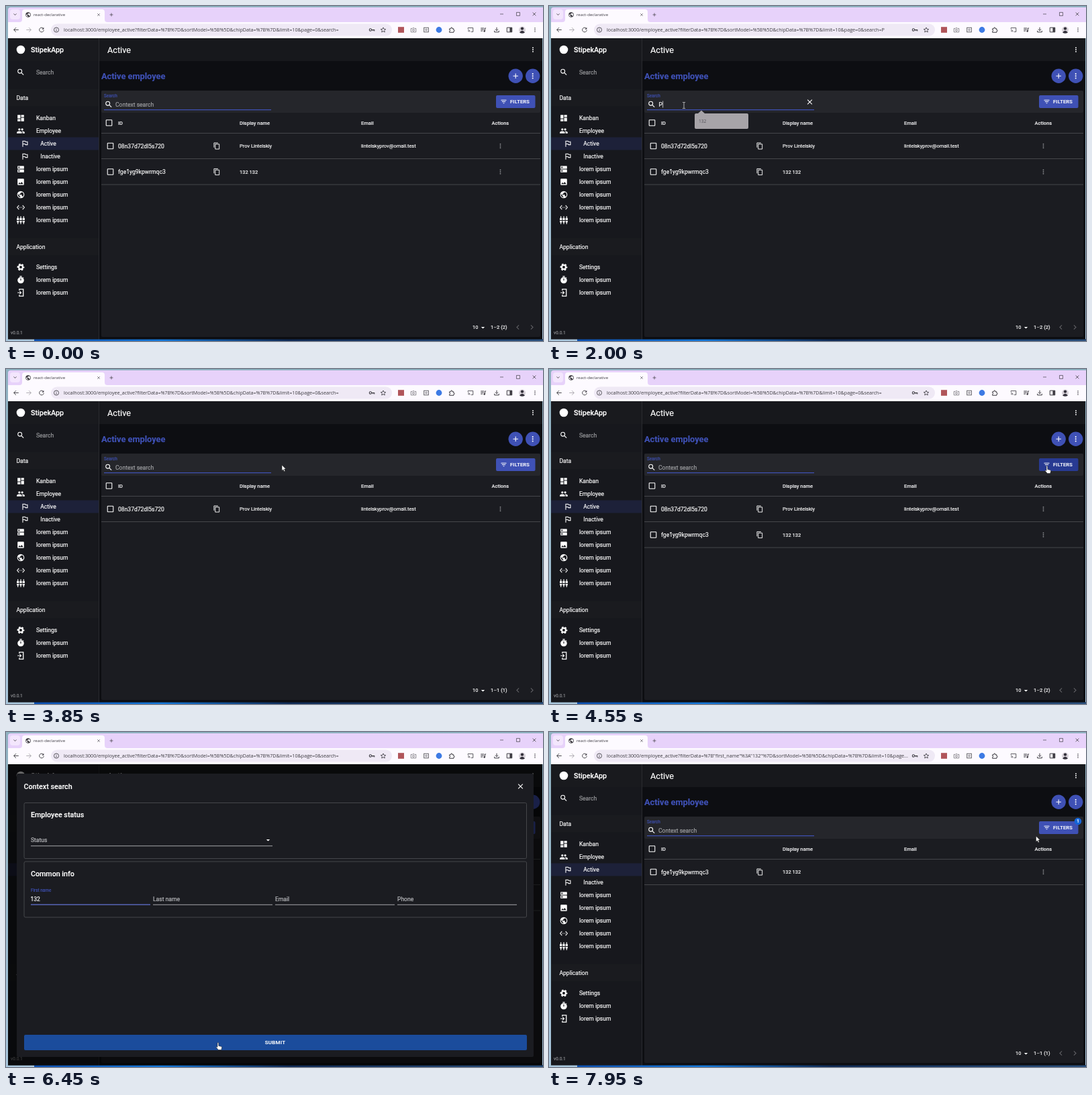
Recreate the animation shown at these times as an HTML page. Size 800 by 499 pixels, loop 8 s.

```html
<!DOCTYPE html>
<html lang="en">
<head>
<meta charset="utf-8">
<title>react-declarative</title>
<style>
html, body { margin: 0; width: 100%; height: 100%; overflow: hidden; background: #0e0f13; }
svg { display: block; width: 100vw; height: 100vh; }
text { font-family: Roboto, sans-serif; white-space: pre; stroke: currentColor; stroke-width: .18; }
.ui { font-family: "Open Sans", sans-serif; stroke: none; }
</style>
</head>
<body>
<svg id="stage" viewBox="0 0 800 499" xmlns="http://www.w3.org/2000/svg"></svg>
<script>
const LOOP = 8000;
const INDIGO = '#3f51b5', WHITE = '#fff', INK = '#3c3a40';
const BODY = 8.56, SMALL = 7.49, TITLE = 10.7, LABEL = 6.42;

// Icons on a 24 unit grid
const stroke = (d, w = 2) => `<path d="${d}" fill="none" stroke="currentColor" stroke-width="${w}"/>`;
const fill = d => `<path d="${d}" fill="currentColor" fill-rule="evenodd"/>`;
const dot = (x, y, r) => `<circle cx="${x}" cy="${y}" r="${r}" fill="currentColor"/>`;
const ring = (x, y, r, w = 2, extra = '') =>
  `<circle cx="${x}" cy="${y}" r="${r}" fill="none" stroke="currentColor" stroke-width="${w}" ${extra}/>`;
const plug = x => stroke(`M${x} 1v6M${x} 17v6`) + fill(`M${x - 3} 6h6v6h-6zM${x - 3} 14h6v2a3 3 0 0 1-6 0z`);
const server = y => fill(`M4 ${y}h16a1 1 0 0 1 1 1v6a1 1 0 0 1-1 1h-16a1 1 0 0 1-1-1v-6a1 1 0 0 1 1-1zM5 ${y + 4}a2 2 0 0 0 4 0a2 2 0 0 0-4 0z`);
const person = x => dot(x, 8, 3) + fill(`M${x - 7} 19v-2.5c0-4.7 14-4.7 14 0V19z`);
const icons = {
  search: ring(9.5, 9.5, 5.5) + stroke('M14 14l5.8 5.8', 2.2),
  dashboard: fill('M3 3h8v10H3zM3 15h8v6H3zM13 11h8v10h-8zM13 3h8v6h-8z'),
  people: person(8) + dot(16, 8, 3) + fill('M16 13c3 0 7 1.2 7 3.5V19h-6v-2.5c0-1.5-.8-2.6-2-3.45z'),
  flag: stroke('M6 21V5h6.4l1 2H19v8h-5.4l-1-2H6'),
  dns: server(3) + server(13),
  image: fill('M5 3h14a2 2 0 0 1 2 2v14a2 2 0 0 1-2 2H5a2 2 0 0 1-2-2V5a2 2 0 0 1 2-2zM8.5 13.5L5 18h14l-4.5-6-3.5 4.5z'),
  globe: fill('M12 2a10 10 0 0 0 0 20a10 10 0 0 0 0-20zM11 19.93A8 8 0 0 1 4.21 10.21L9 15v1a2 2 0 0 0 2 2zM17.9 17.39A2 2 0 0 0 16 16h-1v-3a1 1 0 0 0-1-1H8v-2h2a1 1 0 0 0 1-1V7h2a2 2 0 0 0 2-2v-.41A8 8 0 0 1 17.9 17.39z'),
  code: stroke('M7 6l-5 6 5 6M17 6l5 6-5 6') + fill('M7 11h2v2H7zM11 11h2v2h-2zM15 11h2v2h-2z'),
  plugs: plug(4) + plug(12) + plug(20),
  gear: ring(12, 12, 5.6, 4) + ring(12, 12, 8.4, 3.4, 'stroke-dasharray="5 3.796" stroke-dashoffset="2.5"'),
  timer: fill('M9 1h6v2H9zM12 4a9 9 0 1 0 0 18a9 9 0 0 0 0-18zM11 8h2v6h-2z') + stroke('M18 7l1.7-1.7'),
  exit: stroke('M8 6V2.5h11v19H8V18', 2.4) + stroke('M3 12h9M9 8l4 4-4 4', 2.2),
  copy: stroke('M3 17V2h13') + stroke('M7 6h13v16H7z'),
  box: `<rect x="4" y="4" width="16" height="16" rx="1" fill="none" stroke="currentColor" stroke-width="2"/>`,
  filter: fill('M10 18h4v-2h-4zM3 6v2h18V6zM6 13h12v-2H6z'),
  dots: dot(12, 6, 2) + dot(12, 12, 2) + dot(12, 18, 2),
  plus: stroke('M5 12h14M12 5v14'),
  close: stroke('M5.7 5.7l12.6 12.6M18.3 5.7L5.7 18.3'),
  down: fill('M7 10l5 5 5-5z'),
  left: stroke('M15 6l-6 6 6 6'),
  right: stroke('M9 6l6 6-6 6'),
  chevron: stroke('M6 9l6 6 6-6', 2.6),
  back: stroke('M21 12H4M12 4l-8 8 8 8', 2.2),
  forward: stroke('M3 12h17M12 4l8 8-8 8', 2.2),
  reload: stroke('M19 8a8 8 0 1 0 1 5', 2.2) + fill('M20 3v7h-7z'),
  info: ring(12, 12, 8.5) + fill('M11 11h2v6h-2zM11 7h2v2h-2z'),
  key: ring(7, 12, 4, 2.5) + stroke('M11 12h10v5M16 12v4', 2.5),
  star: stroke('M12 3.5l2.6 5.8 6.3.6-4.8 4.2 1.4 6.2-5.5-3.3-5.5 3.3 1.4-6.2L3.1 9.9l6.3-.6z'),
  camera: stroke('M3 7h5l2-2h4l2 2h5v13H3z') + ring(12, 13, 3.5),
  tile: stroke('M4 4h16v16H4z', 2.5) + ring(12, 12, 3),
  puzzle: stroke('M4 8h5V6a2.5 2.5 0 0 1 5 0v2h5v5h1a2 2 0 0 1 0 4h-1v4H4v-4a2.5 2.5 0 0 0 0-5z', 2.4),
  cast: stroke('M3 9V5h18v14h-7M3 12a7 7 0 0 1 7 7M3 16a3 3 0 0 1 3 3'),
  music: stroke('M3 6h12M3 11h12M3 16h7M18 17V6h4', 2.3) + dot(16, 17, 3),
  download: stroke('M12 3v11M7 10l5 5 5-5M4 15v5h16v-5', 2.4),
  panel: stroke('M3 4h18v16H3z', 2.4) + fill('M13 4h8v16h-8z'),
  minus: stroke('M6 12h12', 1.6),
  square: stroke('M6 6h12v12H6z', 1.6)
};

const esc = s => s.replace(/&/g, '&amp;');
const icon = (name, cx, cy, color = WHITE, size = 12.84) =>
  `<g transform="translate(${cx - size / 2} ${cy - size / 2}) scale(${size / 24})" color="${color}">${icons[name]}</g>`;
const text = (x, cy, s, size = BODY, color = WHITE, weight = 400, extra = '') =>
  `<text x="${x}" y="${cy + size * 0.355}" font-size="${size}" color="${color}" fill="currentColor" font-weight="${weight}" ${extra}>${esc(s)}</text>`;
const rect = (x, y, w, h, color, extra = '') =>
  `<rect x="${x}" y="${y}" width="${w}" height="${h}" fill="${color}" ${extra}/>`;
const circle = (x, y, r, color) => `<circle cx="${x}" cy="${y}" r="${r}" fill="${color}"/>`;
const group = (id, body) => `<g id="${id}">${body}</g>`;

function browser() {
  const bar = [['back', 15], ['forward', 34, '#aaa7ad'], ['reload', 53], ['info', 75], ['key', 545], ['star', 562],
    ['camera', 607, '#77757b'], ['tile', 626, '#66646a'], ['puzzle', 664], ['cast', 692], ['music', 711],
    ['download', 731], ['panel', 750], ['dots', 788]];
  return rect(0, 0, 800, 499, 'url(#desk)') + rect(42, 496, 758, 3, 'url(#bloom)') +
    `<path d="M3 24V6q0-4 4-4h793v22z" fill="#e7d2fa"/>` + rect(3, 24, 797, 24, '#fdfaff') +
    rect(6, 5, 15, 15, '#f3e6fd', 'rx="4"') + icon('chevron', 13.5, 12.5, INK, 8) +
    `<path d="M20 24q4 0 4-4V9q0-4 4-4h115q4 0 4 4v11q0 4 4 4z" fill="#fdfaff"/>` +
    icon('globe', 33, 13, INK, 9) + text(41, 13, 'react-declarative', 6.1, INK, 400, 'class="ui"') +
    icon('close', 138, 13, INK, 7) + icon('plus', 157, 13, INK, 8.5) +
    icon('minus', 738.5, 12, INK, 10) + icon('square', 763, 12, INK, 10) + icon('close', 787, 12, INK, 9) +
    rect(67, 26.4, 508, 18.2, '#efe9f5', 'rx="9.1"') +
    bar.map(([n, x, c = INK]) => icon(n, x, 35.5, c, 10)).join('') +
    rect(584, 31.2, 9, 8.6, '#b0555a') + circle(645, 35.5, 4.4, '#3d7ae4') +
    circle(769, 35.5, 5, '#d9d3da') + circle(769, 33.6, 2.2, '#33303a') + `<path d="M765 39.5q4-5.5 8 0q-4 2.5-8 0z" fill="#33303a"/>` +
    text(86, 35.5, '', 7.17, INK, 400, 'class="ui" id="url"');
}

function sidebar() {
  const items = [['dashboard', 'Kanban', 167], ['people', 'Employee', 186], ['flag', 'Active', 205, 6.2],
    ['flag', 'Inactive', 224, 6.2], ['dns', '', 243], ['image', '', 262], ['globe', '', 281], ['code', '', 300],
    ['plugs', '', 319], ['gear', 'Settings', 389], ['timer', '', 408], ['exit', '', 427]];
  const heads = [['Data', 136.5], ['Application', 358.5]];
  return rect(3, 48, 135, 448.5, '#17181d') + rect(3, 48, 135, 34, '#191a1e') + rect(3, 195.5, 135, 19, '#1d2139') +
    rect(138, 48, 1, 448.5, '#2a2b30') +
    circle(22, 65, 6.3, WHITE) + text(37, 65, 'StipekApp', TITLE, WHITE, 500) +
    icon('search', 22, 98.5) + text(45, 98.5, 'Search', BODY, '#9c9da0') +
    heads.map(([s, y]) => rect(3, y - 12.8, 135, 25.6, '#1a1b1f') + text(15.5, y, s)).join('') +
    items.map(([n, s, y, dx = 0]) => icon(n, 22 + dx, y) + text(45 + dx, y, s || 'lorem ipsum')).join('') +
    text(7, 486.5, 'v0.0.1', 6.6, '#8c8d91');
}

const row = (id, code, name, mail) => group(id,
  icon('box', 155.5, 208.5) + text(167, 208.5, code) +
  icon('copy', 314, 208.5, WHITE, 11) + text(348, 208.5, name, SMALL) + text(529, 208.5, mail, SMALL) +
  icon('dots', 736.5, 208.5, '#86878b', 11) + rect(142, 227, 654, 1, '#45464a'));

function page() {
  const heads = [[167, 'ID'], [348, 'Display name'], [529, 'Email'], [723.5, 'Actions']];
  return rect(139, 48, 660, 448.5, '#0d0e12') + rect(139, 48, 660, 34, '#17181c') +
    text(151, 65, 'Active', 12.7) + icon('dots', 785, 65, WHITE, 11.5) +
    text(142, 104.5, 'Active employee', 12.8, INDIGO, 700) +
    circle(759.2, 104.3, 10.7, INDIGO) + icon('plus', 759.2, 104.3) +
    circle(784.7, 104.3, 10.7, INDIGO) + icon('dots', 784.7, 104.3) +
    rect(142, 126, 654, 367, '#1b1c21', 'rx="2"') + rect(142, 126, 654, 33, '#25262b', 'rx="2"') +
    text(146, 133.5, 'Search', LABEL, INDIGO) + icon('search', 153, 146.5) +
    text(163, 146.5, 'Context search', BODY, '#a2a3a6', 400, 'id="hint"') +
    text(163.5, 146.5, '', BODY, WHITE, 400, 'id="query"') + rect(0, 141.5, .7, 10, WHITE, 'id="queryCaret"') +
    rect(146, 154, 249, 1.2, INDIGO) + group('clear', icon('close', 388.5, 143)) +
    rect(730, 133, 58.5, 19, INDIGO, 'rx="2" id="filters"') + icon('filter', 741.5, 142.5, WHITE, 10.7) +
    text(751, 142.5, 'FILTERS', SMALL, WHITE, 500, 'letter-spacing=".2"') +
    group('badge', circle(788, 133, 5.3, '#1565d8') + text(788, 133, '1', 6.4, WHITE, 500, 'text-anchor="middle"')) +
    icon('box', 153.5, 174) + heads.map(([x, s]) => text(x, 174, s, SMALL, '#e4e4e6', 500)).join('') +
    rect(142, 189, 654, 1, '#45464a') +
    row('rowA', '08n37d72dl5s720', 'Prov Lintelskiy', 'lintelskyprov@omail.test') +
    row('rowB', 'fge1yg9kpwrmqc3', '132 132', '') +
    text(695, 478.5, '10', SMALL) + icon('down', 710.5, 479) + text(722, 478.5, '', SMALL, WHITE, 400, 'id="count"') +
    icon('left', 762.5, 478.5, '#606165') + icon('right', 783.5, 478.5, '#606165');
}

function popup() {
  return `<path d="M219 160h3l5-4.5 5 4.5h63q2 0 2 2v19q0 2-2 2h-76q-2 0-2-2v-19q0-2 2-2z" fill="#a9a6aa"/>` +
    text(223, 172, '132', 6.6, '#55535a', 400, 'class="ui"');
}

function dialog() {
  const card = (y, title) => `<rect x="27" y="${y + .5}" width="748.5" height="83" rx="2" fill="none" stroke="#45464a"/>` +
    text(37, y + 18.5, title, TITLE, WHITE, 500);
  const field = (x, w, y, s) => text(x, y, s, BODY, '#bdbec1') + rect(x, y + 8.3, w, .9, '#b4b5b8');
  return rect(3, 48, 796, 448.5, '#000', 'opacity=".6"') + rect(16, 62, 770, 422, '#1b1c21', 'rx="2"') +
    text(26.5, 81, 'Context search', TITLE, WHITE, 500) + icon('close', 766.5, 81) +
    card(105, 'Employee status') + field(37, 360, 161, 'Status') + icon('down', 390.5, 161) +
    card(192.5, 'Common info') +
    ['', 'Last name', 'Email', 'Phone'].map((s, i) => field(37 + i * 182, 178, 248.5, s)).join('') +
    text(37, 0, 'First name', BODY, '#bdbec1', 400, 'id="nameLabel"') + rect(37, 256.5, 178, 1.2, INDIGO, 'id="nameLine"') +
    text(36.5, 248.5, '', BODY, WHITE, 400, 'id="name"') + rect(0, 243.5, .8, 10.5, WHITE, 'id="nameCaret"') +
    rect(27, 451, 749, 23, '#1360d3', 'rx="2" id="submit"') +
    text(401, 462.5, 'SUBMIT', 8, WHITE, 500, 'text-anchor="middle" letter-spacing=".23"');
}

function cursors() {
  return group('arrow', '<path d="M0 0v8.5l2-1.8 1.4 3 1.5-.7-1.4-2.9H6z" fill="#fff" stroke="#111" stroke-width=".5"/>') +
    group('beam', '<path d="M-2-4.5h1.5l.5.5.5-.5H2M-2 4.5h1.5l.5-.5.5.5H2M0-4v8" fill="none" stroke="#d8d8da" stroke-width=".8"/>') +
    group('hand', '<path d="M-1 0q1-1 1.8 0v4.5l4 1q1 .4.8 1.6L4.8 10.5H.3L-3 6.5q.5-1.3 2 0z" fill="#fff" stroke="#111" stroke-width=".5"/>');
}

const stage = document.getElementById('stage');
stage.innerHTML = `<defs>
  <linearGradient id="desk" x2="0" y2="1"><stop stop-color="#8fb1c0"/><stop offset="1" stop-color="#a9c6dc"/></linearGradient>
  <linearGradient id="bloom"><stop stop-color="#0c4fb0"/><stop offset=".25" stop-color="#1577d8"/><stop offset=".5" stop-color="#0f2a55"/><stop offset="1" stop-color="#2a4f7c"/></linearGradient>
  </defs>` + browser() + sidebar() + page() + group('popup', popup()) + group('dialog', dialog()) + cursors();

const el = {};
stage.querySelectorAll('[id]').forEach(n => el[n.id] = n);
const set = (id, attrs) => { for (const k in attrs) el[id].setAttribute(k, attrs[k]); };
const show = (id, on) => set(id, { opacity: +on, visibility: on ? 'visible' : 'hidden' });
const write = (id, s) => { if (el[id].textContent !== s) el[id].textContent = s; };
const span = (t, a, b) => Math.min(1, Math.max(0, (t - a) / (b - a)));
const ease = p => p * p * (3 - 2 * p);
const within = (t, a, b) => t >= a && t < b;

// Time, x, y of the pointer
const path = [[350, 420, 496], [1250, 201, 148], [2950, 201, 148], [3600, 388, 144], [3760, 388, 144], [3850, 411, 143],
  [4450, 742, 145], [4850, 742, 145], [5300, 143, 252.5], [5700, 143, 252.5], [6350, 316, 463], [7250, 316, 463],
  [7900, 725.5, 155], [8000, 725.5, 155]];

function pointer(t) {
  const i = path.findIndex(k => k[0] > t);
  const [a, x0, y0] = path[i - 1], [b, x1, y1] = path[i];
  const p = ease(span(t, a, b));
  return [x0 + (x1 - x0) * p, y0 + (y1 - y0) * p];
}

// Latest entry whose time has come
const typed = (t, steps) => steps.reduce((s, [at, v]) => t >= at ? v : s, '');

function caret(id, owner, on) {
  show(id, on);
  set(id, { x: +el[owner].getAttribute('x') + el[owner].getComputedTextLength() + .5 });
}

function render(t) {
  const query = typed(t, [[1950, 'P'], [2300, 'Pr'], [2600, 'Pro'], [2650, 'Prov'], [3750, '']]);
  const filtered = t >= 7150;
  const data = filtered ? '%7B"first_name"%3A"132"%7D' : '%7B%7D';
  const tail = filtered ? '...' : '=0&search=' + query.slice(0, 2);
  write('url', `localhost:3000/employee_active?filterData=${data}&sortModel=%5B%5D&chipData=%7B%7D&limit=10&page${tail}`);
  write('query', query);
  show('hint', !query);
  show('clear', !!query);
  caret('queryCaret', 'query', within(t, 1950, 2500));
  show('popup', span(t, 1500, 1600) * (1 - span(t, 2000, 2150)));

  const onlyA = within(t, 2900, 4200), onlyB = t >= 7400;
  show('rowA', !onlyB);
  show('rowB', !onlyA);
  set('rowB', { transform: `translate(0 ${onlyB ? 0 : 38.5})` });
  write('count', onlyA || onlyB ? '1–1 (1)' : '1–2 (2)');
  show('badge', onlyB);

  show('dialog', ease(span(t, 4650, 4875)) * (1 - ease(span(t, 7150, 7350))));
  const f = span(t, 5330, 5530), p = 1 - (1 - f) ** 2;
  const size = BODY + (LABEL - BODY) * p;
  set('nameLabel', { 'font-size': size, y: 248.5 - 12.5 * p + size * .355, color: f > 0 ? INDIGO : '#bdbec1' });
  set('nameLine', { x: 126 - 89 * p, width: 178 * p });
  write('name', typed(t, [[5800, '1'], [5950, '13'], [6100, '132']]));
  caret('nameCaret', 'name', within(t, 5330, 6200));

  const on = t >= 350, [x, y] = on ? pointer(t) : [0, 0];
  const open = within(t, 4750, 7200);
  const overFilters = !open && x > 730 && y > 133 && y < 152;
  const overSubmit = open && y > 451;
  const overInput = open ? within(y, 240, 258) && x < 215 : within(x, 146, 395) && within(y, 138, 156);
  const overClear = !open && query && overInput && x > 380;
  const kind = overFilters || overSubmit || overClear ? 'hand' : overInput ? 'beam' : 'arrow';
  for (const c of ['arrow', 'beam', 'hand']) {
    show(c, on && c === kind);
    set(c, { transform: `translate(${x} ${y})` });
  }
  set('filters', { fill: overFilters ? '#283a92' : INDIGO });
  set('submit', { fill: overSubmit ? '#1b4c9c' : '#1360d3' });
}

function tick() {
  render(performance.now() % LOOP);
  requestAnimationFrame(tick);
}
tick();
</script>
</body>
</html>
```
